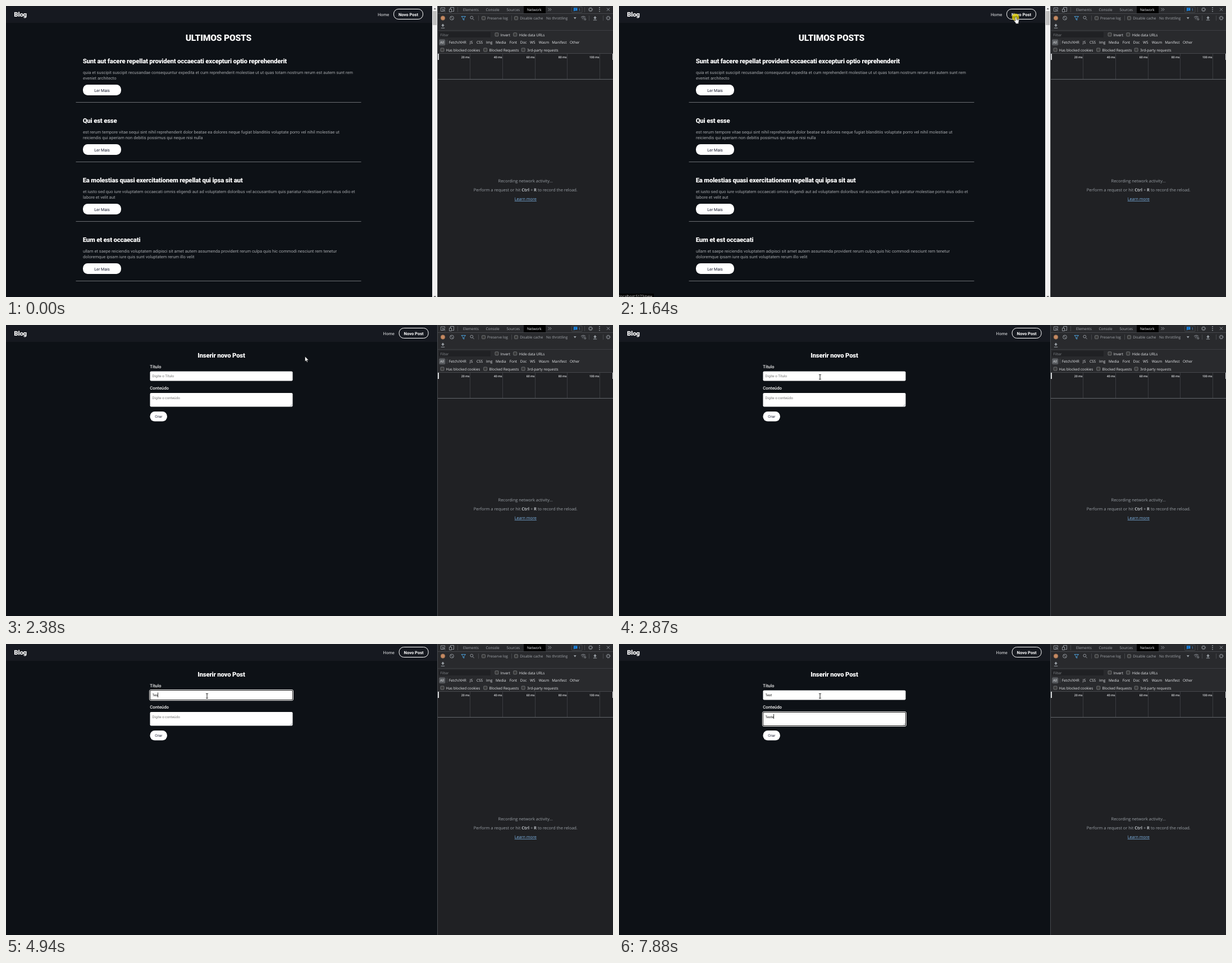
Write an HTML page that moves like this. It is 1081x518 px and loops after 8 s.

```html
<!DOCTYPE html>
<html lang="pt">
<head>
<meta charset="utf-8">
<title>Blog</title>
<style>
html, body { margin: 0; width: 100%; height: 100%; overflow: hidden; background: #0d1116; }
svg { display: block; width: 100%; height: 100%; }
text { font-family: Roboto, sans-serif; font-size: 7.55px; text-rendering: geometricPrecision; white-space: pre; }
.mid { text-anchor: middle; }
.end { text-anchor: end; }
.h1 { font-size: 15.6px; font-weight: 800; letter-spacing: -.2px; fill: #fff; }
.h3 { font-size: 11.4px; font-weight: 800; letter-spacing: -.2px; fill: #fff; }
.p { fill: #a3a6aa; }
.btn { font-size: 7.2px; fill: #14182c; }
.label { font-size: 7.8px; font-weight: 500; fill: #f4f4f4; }
.hint { font-size: 6.3px; fill: #757575; }
.typed { font-size: 6.1px; fill: #111; }
.ui { font-family: "Open Sans", "Noto Sans", sans-serif; font-size: 6.45px; fill: #a4a8ad; }
.lit { fill: #e8eaed; }
.ms { font-size: 5.2px; font-weight: 600; }
.note { font-size: 7.45px; fill: #9aa0a6; }
.icon { fill: none; stroke: #9aa0a6; stroke-width: .9; }
.solid { fill: #9aa0a6; stroke: none; }
</style>
</head>
<body>
<svg id="stage" viewBox="0 0 1081 518" preserveAspectRatio="none"></svg>
<script>
const LOOP = 8000;
const stage = document.getElementById('stage');

const rect = (x, y, w, h, fill, r = 0, more = '') =>
  `<rect x="${x}" y="${y}" width="${w}" height="${h}" rx="${r}" fill="${fill}" ${more}/>`;
const text = (x, y, cls, s, more = '') => `<text x="${x}" y="${y}" class="${cls}" ${more}>${s}</text>`;
const path = (d, cls = 'icon', more = '') => `<path d="${d}" class="${cls}" ${more}/>`;
const group = (id, body) => `<g id="${id}">${body}</g>`;

const POSTS = [
  ['Sunt aut facere repellat provident occaecati excepturi optio reprehenderit',
   'quia et suscipit suscipit recusandae consequuntur expedita et cum reprehenderit molestiae ut ut quas totam nostrum rerum est autem sunt rem',
   'eveniet architecto'],
  ['Qui est esse',
   'est rerum tempore vitae sequi sint nihil reprehenderit dolor beatae ea dolores neque fugiat blanditiis voluptate porro vel nihil molestiae ut',
   'reiciendis qui aperiam non debitis possimus qui neque nisi nulla'],
  ['Ea molestias quasi exercitationem repellat qui ipsa sit aut',
   'et iusto sed quo iure voluptatem occaecati omnis eligendi aut ad voluptatem doloribus vel accusantium quis pariatur molestiae porro eius odio et',
   'labore et velit aut'],
  ['Eum et est occaecati',
   'ullam et saepe reiciendis voluptatem adipisci sit amet autem assumenda provident rerum culpa quis hic commodi nesciunt rem tenetur',
   'doloremque ipsam iure quis sunt voluptatem rerum illo velit']
];

const post = ([title, a, b], i) => `<g transform="translate(0 ${i * 106})">` +
  text(136.7, 102.2, 'h3', title) + text(137, 120.8, 'p', a) + text(137, 130.6, 'p', b) +
  rect(137, 140, 68, 19, '#fff', 8.4) + text(171, 152.8, 'btn mid', 'Ler Mais') +
  rect(124.5, 171, 508, 1, '#6b6e72') + '</g>';

const list = () => text(378.4, 62.3, 'h1 mid', 'ULTIMOS POSTS') + POSTS.map(post).join('') +
  rect(759, 0, 9, 518, '#f1f1f1') + rect(760, 9, 7, 25, '#c1c1c1') +
  path('M761.5 6L763.7 3.5 766 6z', '', 'fill="#606060"') +
  path('M761.5 516.5H766L763.7 519z', '', 'fill="#404040"');

const ring = (id, y, h) => group(id,
  rect(255.5, y, 256, h, 'none', 2.5, 'stroke="#fff"') +
  rect(256.5, y + 1, 254, h - 2, 'none', 1.5, 'stroke="#101010"'));

const form = () => text(383.5, 58.2, 'h3 mid', 'Inserir novo Post') +
  text(256.2, 77, 'label', 'Título') + rect(256.5, 82.4, 254, 17.2, '#fff', 2) +
  text(256.2, 115.4, 'label', 'Conteúdo') + rect(256.5, 120.9, 254, 24.7, '#fff', 2) +
  path('M506 144.8L509.7 141M508.2 144.8L509.7 143.2', 'icon', 'stroke-width=".6"') +
  ring('ringTitle', 81.5, 19) + ring('ringBody', 120.5, 26) +
  text(260.5, 93.2, 'hint', 'Digite o Título', 'id="hintTitle"') +
  text(260.5, 131.6, 'hint', 'Digite o conteúdo', 'id="hintBody"') +
  text(260.5, 93.2, 'typed', '', 'id="title"') + text(260.5, 131.6, 'typed', '', 'id="body"') +
  rect(0, 0, .8, 8.6, '#000', 0, 'id="caret"') +
  rect(256.5, 154, 30.4, 17.6, '#fff', 8.4) +
  text(271.7, 165.2, 'btn mid', 'Criar', 'style="font-size:6.2px"');

const header = () => rect(0, 0, 769, 30, '#161920') +
  text(14.3, 18.8, 'h3', 'Blog') +
  group('nav', text(662, 17.8, '', 'Home', 'fill="#b9bbbe" font-weight="500"') +
    rect(690.5, 5.5, 52, 18, 'none', 8.4, 'stroke="#fff"') +
    text(716.5, 17.6, 'mid', 'Novo Post', 'fill="#fff" font-weight="700"'));

const row = (y, cls, items) => items.map(([x, s]) => text(x, y, 'ui ' + cls, s)).join('');
const box = (x, y) => rect(x, y, 6, 6, '#3b3b3b', 1, 'stroke="#85888c" stroke-width=".7"');
const sep = (x, y) => rect(x, y, 1, 9, '#45474b');
const line = (y, color) => rect(769, y, 312, 1, color);
const gear = (x, y) => `<circle cx="${x}" cy="${y}" r="2.5" class="icon" stroke-width="1.4"/>` +
  `<circle cx="${x}" cy="${y}" r="3.6" class="icon" stroke-dasharray="1.4 1.43"/>`;

const icons = () =>
  path('M778 9.5H774.5V3H781.5V5.5M777.5 5.5L782 7.5 780 8.2 782 10.5M777.5 5.5L778.5 10 780 8.2') +
  path('M791.5 6V2.5H797.5V9.5H794.5M789.5 5.5H793.5V10.5H789.5z') +
  path('M965.5 3.8L968 6.3 965.5 8.8M968.5 3.8L971 6.3 968.5 8.8') +
  rect(1007.5, 1.5, 18.5, 10, 'none', 1, 'stroke="#4a4c50" stroke-width=".8"') +
  path('M1011 3.2H1017.4V8.2H1012.6L1011 9.8z', '', 'fill="#1a8cf0"') +
  path('M1012.4 4.9H1016M1012.4 6.4H1015', 'icon', 'style="stroke:#18324d;stroke-width:.6"') +
  text(1019.4, 8.8, 'ui', '1', 'style="fill:#5eaaf5"') +
  gear(1041, 6.3) + gear(1072.5, 21.5) +
  [3, 6.3, 9.6].map(y => `<circle cx="1057" cy="${y}" r=".9" class="solid"/>`).join('') +
  path('M1070 3.7L1075 8.7M1075 3.7L1070 8.7') +
  '<circle cx="778" cy="21.5" r="3.7" fill="#c58a62"/><circle cx="778" cy="21.5" r="3.9" class="icon" style="stroke:#8a6349"/>' +
  '<circle cx="794" cy="21.5" r="3.4" class="icon"/>' + path('M791.6 19.1L796.4 23.9') +
  path('M811 18.5H818.5L815.7 21.8V25.2L813.8 24V21.8z', 'icon', 'style="stroke:#4fa9e6"') +
  '<circle cx="829.3" cy="20.6" r="2.4" class="icon"/>' + path('M831 22.5L833.6 25.1') +
  path('M1011 20H1015.6L1013.3 23.4z', 'solid') +
  path('M1024 20.2Q1028 16.6 1032 20.2M1025.6 22.1Q1028 20 1030 21.4M1027 23.5L1028 24.5') +
  '<circle cx="1031.3" cy="23.6" r="1.4" class="icon"/>' +
  path('M1049 18L1052 21.4H1050V23.6H1048V21.4H1046zM1045.8 24.4H1052.2V25.4H1045.8z', 'solid') +
  path('M778 37.2L781 33.8H779V32H777V33.8H775zM774.8 38.8H781.2V39.8H774.8z', 'solid');

const tick20 = i => {
  const x = Math.round(768.8 + i * 57.6);
  return rect(x, 85, 1, 45, '#3a3c40') + text(x - .4, 93.3, 'ui lit ms end', i * 20 + ' ms');
};

const devtools = () => rect(769, 0, 312, 518, '#202124') + rect(769, 0, 312, 85, '#292a2d') +
  rect(768, 0, 1, 518, '#494c50') + line(13, '#45474b') + line(43, '#3c3e42') +
  rect(922, 0, 39, 13, '#000') + rect(771, 46, 92, 10, '#202124') +
  rect(771, 59.2, 11.5, 11, '#55585c', 2.5) +
  [[804, 2], [1030, 2], [841, 17], [900, 17], [1038, 17], [1063, 17], [785, 60]].map(s => sep(...s)).join('') +
  [[847.5, 18.6], [905.5, 18.6], [871, 47.8], [903.7, 47.8], [774, 75], [850.7, 75], [918.2, 75]].map(b => box(...b)).join('') +
  row(9, '', [[814, 'Elements'], [854.5, 'Console'], [891.5, 'Sources']]) + text(928, 9, 'ui lit', 'Network') +
  row(24.2, '', [[857, 'Preserve log'], [915.3, 'Disable cache'], [962, 'No throttling']]) +
  text(773.3, 54, 'ui', 'Filter', 'style="fill:#85898e"') +
  row(53.6, 'lit', [[880.5, 'Invert'], [913.7, 'Hide data URLs']]) +
  row(67.3, 'lit', [[773, 'All'], [788.7, 'Fetch/XHR'], [826, 'JS'], [838, 'CSS'], [855, 'Img'], [872, 'Media'],
    [896.7, 'Font'], [915.7, 'Doc'], [933, 'WS'], [948.7, 'Wasm'], [972.3, 'Manifest'], [1004, 'Other']]) +
  row(80.5, 'lit', [[783.7, 'Has blocked cookies'], [860.5, 'Blocked Requests'], [928, '3rd-party requests']]) +
  icons() + line(84, '#45474b') + [1, 2, 3, 4, 5].map(tick20).join('') +
  rect(769, 85, 2, 11, '#d5d7da') + rect(1080, 85, 1, 11, '#d5d7da') + line(130, '#63666a') +
  text(925.2, 314.2, 'ui note mid', 'Recording network activity…') +
  text(925.3, 330.2, 'ui note mid',
    'Perform a request or hit <tspan font-weight="700" fill="#bdc1c6">Ctrl</tspan> + <tspan font-weight="700" fill="#bdc1c6">R</tspan> to record the reload.') +
  text(925.3, 345.9, 'ui mid', 'Learn more', 'style="font-size:7.25px;fill:#80b8ea;text-decoration:underline"');

// Pointer shapes, each with its hot spot at 0,0
const pointers = () =>
  group('arrow', path('M0 0V9.2L2.1 7.3 3.5 10.4 4.9 9.8 3.5 6.8H6.5z', '', 'fill="#fff" stroke="#000" stroke-width=".5"')) +
  group('hand', path('M-1.2 .6Q0 -.7 1.1 .6V4L5 5Q5.6 5.4 5.5 6.5L4.6 9.5V12.2H-.6V10.8L-3.6 7.3Q-3.7 5.8 -2.4 6.3L-1.2 7.4z',
    '', 'fill="#fff" stroke="#000" stroke-width=".5"') +
    path('M1.1 4V6.2M2.6 4.6V6.5M4 4.9V6.6', '', 'stroke="#000" stroke-width=".4"')) +
  group('beam', path('M-2 -4.2H-.4L0 -3.8 .4 -4.2H2M0 -3.8V3.8M-2 4.2H-.4L0 3.8 .4 4.2H2', '', 'fill="none" stroke="#000" stroke-width=".9"'));

stage.innerHTML = rect(0, 0, 1081, 518, '#0d1116') + header() + group('list', list()) + group('form', form()) +
  devtools() +
  group('status', rect(0, 512, 62, 6, '#000') + text(1, 519, 'ui', 'localhost:5173/new', 'style="fill:#e8e8e8"')) +
  '<circle id="click" r="6.4" fill="#f2e000" fill-opacity=".72"/>' + group('pointer', pointers());

const el = {};
stage.querySelectorAll('[id]').forEach(n => { el[n.id] = n; });
const show = (id, on) => { el[id].style.display = on ? '' : 'none'; };
const within = (t, a, b) => t >= a && t < b;

// Pointer travel: start, end, number of steps, whether the first step already moves, from, to
const MOVES = [
  [180, 960, 12, 0, [1018, 496], [707, 73]],
  [1030, 1240, 4, 1, [707, 73], [707, 19.3]],
  [2030, 2800, 12, 1, [707, 19.3], [358, 92.5]]
];

function pointerAt(t) {
  const [a, b, n, lead, from, to] = MOVES.filter(m => t >= m[0]).pop() || MOVES[0];
  const k = Math.max(0, Math.min(n - 1, Math.floor((t - a) / (b - a) * (n - 1) + 1e-6)));
  const p = (k + lead) / (n - 1 + lead);
  const e = p * p * (3 - 2 * p);
  return from.map((v, i) => v + (to[i] - v) * e);
}

// Time, field, text, caret shown
const TYPING = [
  [2940, 'title', '', 1], [3470, 'title', '', 0], [4000, 'title', 'T', 1], [4480, 'title', 'T', 0],
  [4610, 'title', 'Te', 1], [4940, 'title', 'Tes', 1], [5140, 'title', 'Test', 1], [5670, 'title', 'Test', 0],
  [6000, 'body', '', 1], [6530, 'body', '', 0], [6600, 'body', 'T', 1], [6800, 'body', 'Te', 1],
  [6930, 'body', 'Tes', 1], [7130, 'body', 'Test', 1], [7610, 'body', 'Test', 0], [7880, 'body', 'Teste', 1]
];

function drawForm(t) {
  const [, field, value, caret] = TYPING.filter(s => t >= s[0]).pop() || [0, '', '', 0];
  const title = field === 'title' ? value : field ? 'Test' : '';
  const body = field === 'body' ? value : '';
  el.title.textContent = title;
  el.body.textContent = body;
  show('hintTitle', !title);
  show('hintBody', !body);
  show('ringTitle', field === 'title');
  show('ringBody', field === 'body');
  show('caret', caret);
  if (caret) {
    const w = value ? el[field].getComputedTextLength() : 0;
    el.caret.setAttribute('x', 260.3 + w);
    el.caret.setAttribute('y', field === 'title' ? 86.4 : 124.6);
  }
}

function draw(t) {
  const onForm = t >= 1770;
  show('list', !onForm);
  show('form', onForm);
  el.nav.setAttribute('transform', `translate(${onForm ? 9.6 : 0} 0)`);
  if (onForm) drawForm(t);

  show('status', within(t, 1440, 2300));
  const [x, y] = pointerAt(t);
  const left = onForm ? 700 : 690;
  const overLink = x > left && x < left + 53 && y < 24;
  const overField = onForm && x < 510 && y > 82;
  show('pointer', t >= 180);
  show('hand', overLink);
  show('beam', overField);
  show('arrow', !overLink && !overField);
  el.pointer.setAttribute('transform', `translate(${x} ${y})`);
  show('click', within(t, 1510, 1770) || within(t, 2940, 3010));
  el.click.setAttribute('cx', x - .8);
  el.click.setAttribute('cy', y + .6);
}

const start = performance.now();
function tick() {
  draw((performance.now() - start) % LOOP);
  requestAnimationFrame(tick);
}
tick();
</script>
</body>
</html>
```
